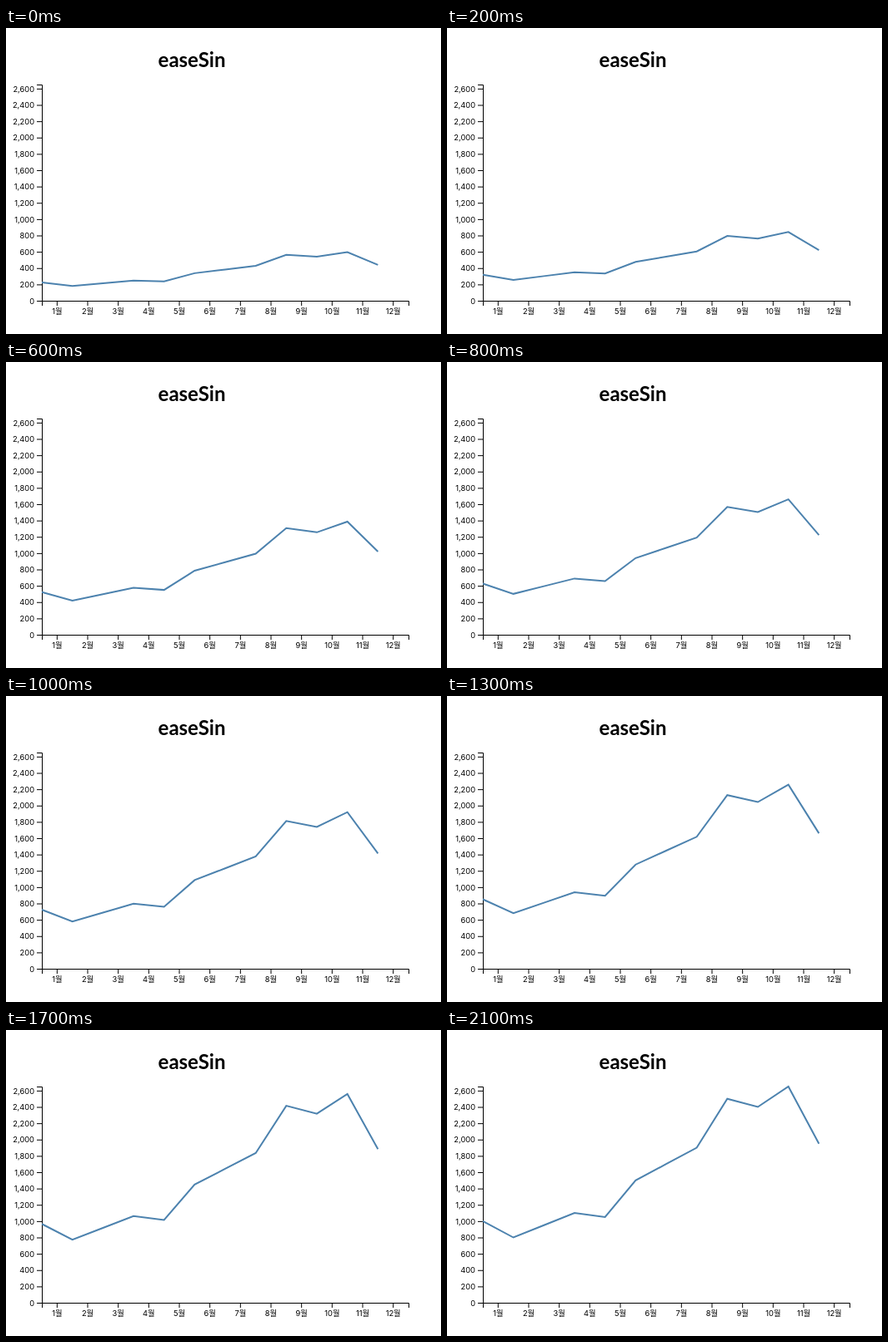
Animation of 522x368 px, one loop 4.8 s. Source, as an HTML page:

```html
<!DOCTYPE html>
<html lang="ko">
<head>
<meta charset="utf-8">
<title>easeSin</title>
<style>
  html, body { margin: 0; width: 100%; height: 100%; overflow: hidden; background: #fff; }
  svg { display: block; }
  text { font: 9.3px Inter, "Noto Sans CJK KR", "Noto Sans CJK", sans-serif; }
  .title { font: bold 24px Lato, sans-serif; text-anchor: middle; }
  .left text { text-anchor: end; }
  .bottom text { text-anchor: middle; }
  .axis path { fill: none; stroke: #000; }
  #line { fill: none; stroke: #4c82ae; stroke-width: 2; }
</style>
</head>
<body>
<svg width="522" height="368" viewBox="0 0 522 368">
  <text class="title" x="223" y="47">easeSin</text>
  <g id="chart" transform="translate(43 68)">
    <g class="axis left"></g>
    <g class="axis bottom" transform="translate(0 260)"></g>
    <polyline id="line"/>
  </g>
</svg>
<script>
const WIDTH = 440, HEIGHT = 260, MAX = 2650;
const LOOP = 4800, STEP = 100, DURATION = 3000, HEAD_START = 944;
const values = [1000, 800, 950, 1100, 1050, 1500, 1700, 1900, 2500, 2400, 2650, 1950];
const band = WIDTH / values.length;
const y = value => HEIGHT * (1 - value / MAX);
const easeSin = u => (1 - Math.cos(Math.PI * u)) / 2;

function drawAxes() {
  let left = `<path d="M-6 ${HEIGHT + 0.5}H0.5V0.5H-6"/>`;
  for (let value = 0; value <= MAX; value += 200) {
    left += `<g transform="translate(0 ${y(value) + 0.5})"><path d="M0 0H-6"/>
      <text x="-9" y="3.2">${value.toLocaleString('en-US')}</text></g>`;
  }
  let bottom = `<path d="M0.5 6V0.5H${WIDTH + 0.5}V6"/>`;
  values.forEach((_, i) => {
    bottom += `<g transform="translate(${(i + 0.5) * band} 0)"><path d="M0 0V6"/>
      <text y="16">${i + 1}월</text></g>`;
  });
  document.querySelector('.left').innerHTML = left;
  document.querySelector('.bottom').innerHTML = bottom;
}

const line = document.getElementById('line');

function render(time) {
  const t = Math.floor(time % LOOP / STEP) * STEP;
  const growth = easeSin(Math.min(1, (t + HEAD_START) / DURATION));
  line.setAttribute('points', values.map((v, i) => `${i * band},${y(v * growth)}`).join(' '));
}

drawAxes();
const start = performance.now();
function tick() {
  render(performance.now() - start);
  requestAnimationFrame(tick);
}
tick();
</script>
</body>
</html>
```
